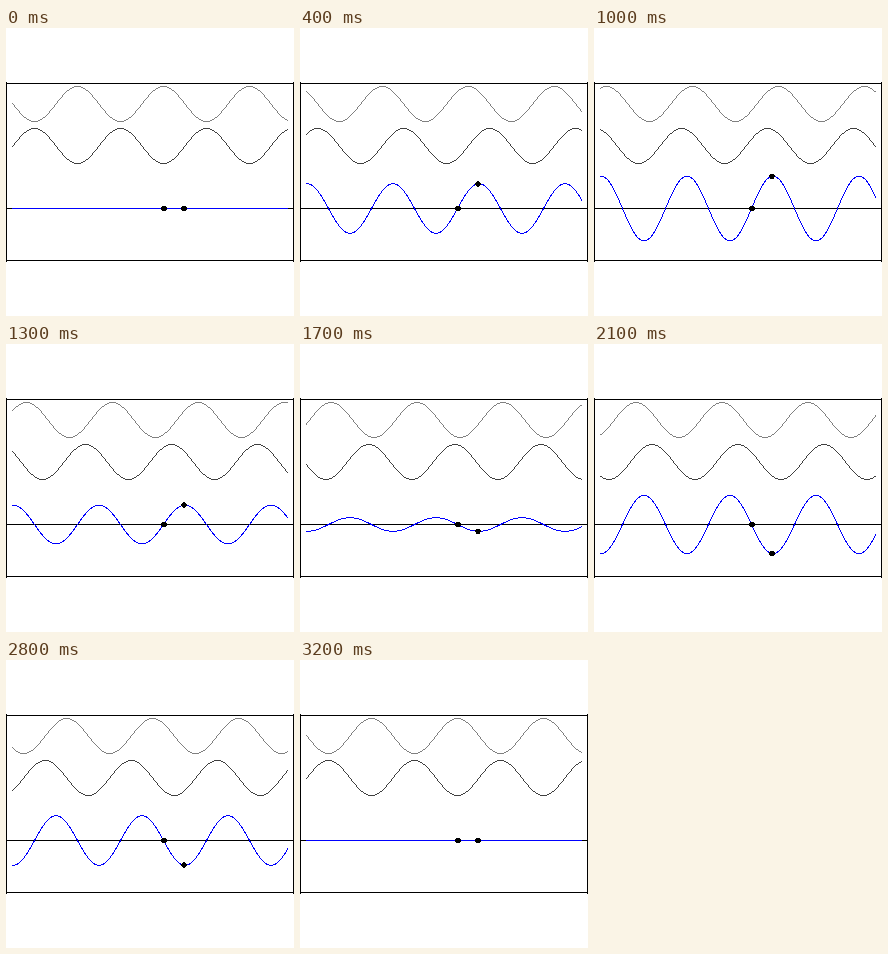
Animation of 288x288 px, one loop 3300 ms. Source, as a matplotlib script:

```python
import numpy as np
import matplotlib.pyplot as plt
from matplotlib.animation import FuncAnimation

SIZE, DPI = 288, 72
FRAMES, PERIOD = 33, 32
K = 2 * np.pi / 86           # wave number per pixel
AMP = 17.5
ORIGIN = 157.5
NODE_X, ANTINODE_X = 158, 178
RIGHT_Y, LEFT_Y, SUM_Y = 76.0, 118.0, 180.5
BLACK, DARK, GRAY, BLUE = (0, 0, 0), (64, 64, 64), (128, 128, 128), (0, 0, 255)

# Pixel centres: every shape is a crisp, unsmoothed mask over this grid
yy, xx = np.mgrid[0:SIZE, 0:SIZE] + 0.5
inside = (xx > 6) & (xx < 282)

fig = plt.figure(figsize=(SIZE / DPI, SIZE / DPI), dpi=DPI, facecolor="white")
ax = fig.add_axes([0, 0, 1, 1])
ax.axis("off")


def travelling(x, phase):
    """Height and slope of a wave that moves right as phase grows."""
    angle = K * (x - ORIGIN) - phase
    return AMP * np.cos(angle), -AMP * K * np.sin(angle)


def standing(x, phase):
    """Sum of two opposite waves: height and slope."""
    angle, size = K * (x - ORIGIN), 2 * AMP * np.sin(phase)
    return size * np.sin(angle), size * K * np.cos(angle)


def curve(base, wave, extent):
    """One-pixel curve; extent gives its vertical size for a slope."""
    height, slope = wave
    return inside & (np.abs(yy - base + height) <= extent(1, np.abs(slope)) / 2)


def dot(x, y):
    return np.hypot(xx - x, yy - y) < 2.75


def still_parts():
    page = np.full((SIZE, SIZE, 3), 255, np.uint8)
    page[[55, 180, 232]] = BLACK
    page[54:234, [0, -1]] = BLACK
    return page


backdrop = still_parts()
view = ax.imshow(backdrop, extent=(0, SIZE, SIZE, 0), interpolation="nearest",
                 aspect="auto")


def update(i):
    phase = 2 * np.pi * (i % PERIOD) / PERIOD
    page = backdrop.copy()
    page[curve(RIGHT_Y, travelling(xx, phase), np.maximum)] = GRAY
    page[curve(LEFT_Y, travelling(xx, np.pi - phase), np.maximum)] = DARK
    page[curve(SUM_Y, standing(xx, phase), np.hypot)] = BLUE
    page[dot(NODE_X, SUM_Y)] = BLACK
    page[dot(ANTINODE_X, SUM_Y - standing(ANTINODE_X, phase)[0])] = BLACK
    view.set_data(page)
    return view,


anim = FuncAnimation(fig, update, frames=FRAMES, interval=100,
                     repeat=True, repeat_delay=0)
plt.show()
```
